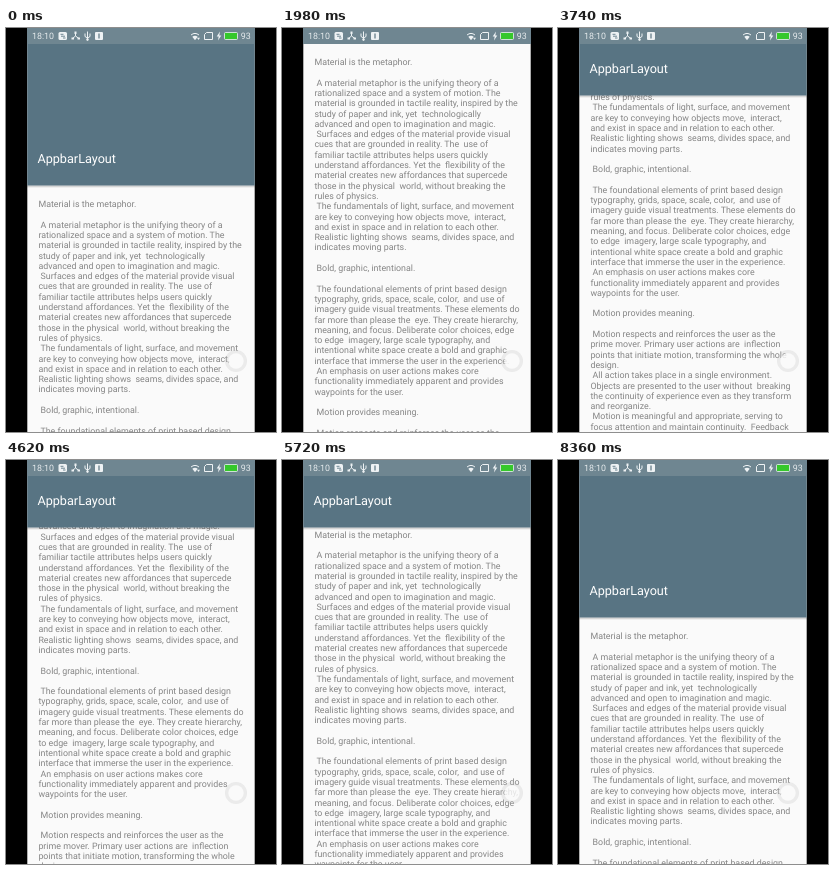
An HTML page that plays this animation: 270x404 px, repeating every 8800 ms.

```html
<!DOCTYPE html>
<html lang="en">
<head>
<meta charset="utf-8">
<title>AppbarLayout</title>
<style>
  html, body { margin: 0; height: 100%; overflow: hidden; background: #000; }
  svg { display: block; width: 100%; height: 100%; }
  text { font-family: Roboto, "Noto Sans", sans-serif; font-size: 8.87px; white-space: pre; text-rendering: geometricPrecision; }
  #lines { fill: #858585; }
  #title { font-size: 12.67px; fill: #fff; }
  #status text { fill: #e6ebed; }
  .line { fill: none; stroke: #eef2f4; stroke-width: 1; }
  .solid { fill: #eef2f4; }
  .mark { fill: none; stroke: #6f8691; }
</style>
</head>
<body>
<svg viewBox="0 0 270 404">
  <defs>
    <clipPath id="screen"><rect x="21.3" width="227.4" height="404"/></clipPath>
    <linearGradient id="fade" x2="0" y2="1">
      <stop offset="0" stop-opacity=".25"/>
      <stop offset="1" stop-opacity="0"/>
    </linearGradient>
  </defs>
  <rect width="270" height="404"/>
  <g clip-path="url(#screen)">
    <rect x="21" width="228" height="404" fill="#fafafa"/>
    <g id="lines"></g>
    <g id="bar">
      <rect id="shadow" x="21" width="228" height="2.5" fill="url(#fade)"/>
      <rect x="21" y="-160" width="228" height="160" fill="#587483"/>
      <text id="title" x="31.4" y="-22.2">AppbarLayout</text>
    </g>
    <g id="status">
      <rect x="21" width="228" height="16" fill="#6f8691"/>
      <text x="26" y="11.2">18:10</text>
      <rect class="solid" x="52.5" y="4" width="8.5" height="8" rx="1.5"/>
      <path class="mark" d="M54.5 6.3h3M55 8.200h4M57 10h2.500"/>
      <path class="line" d="M69.500 4v4l-3 2.500M69.500 8l3.500 2.500"/>
      <path class="solid" d="M68.500 3.500h2v2.500h-2zM65.500 9.500h2.500v2h-2.500zM71.500 9.500h2.500v2h-2.500z"/>
      <path class="line" d="M81.500 3.500v9M79 5.500v3l2.500 1.500 2.500-1.500v-3"/>
      <circle class="solid" cx="81.500" cy="11.500" r="1.200"/>
      <rect class="solid" x="89" y="4" width="8" height="8" rx="1"/>
      <path class="mark" stroke-width="1.400" d="M93 5.500v5"/>
      <path class="line" d="M185 7q4-3.200 8 0"/>
      <path class="solid" d="M186.300 8.800q2.700-2 5.400 0l-2.700 3.400z"/>
      <path class="solid" id="traffic" d="M191 9.700h3l-1.500 2.300z"/>
      <path class="line" d="M200.500 4.500h6v7h-8v-5z"/>
      <path class="solid" d="M214 3.500l-3.300 5h2l-.7 4 3.300-5h-2z"/>
      <rect x="218.500" y="4.500" width="13" height="7" rx="1" fill="#35c82b" stroke="#eef2f4" stroke-width=".8"/>
      <text x="234.700" y="11.200">93</text>
    </g>
    <circle cx="230" cy="333" r="11" fill="#bbb" fill-opacity=".25"/>
    <circle cx="230" cy="333" r="7.700" fill="#fff" fill-opacity=".75"/>
  </g>
</svg>
<script>
const copy = `Material is the metaphor.

 A material metaphor is the unifying theory of a
rationalized space and a system of motion. The
material is grounded in tactile reality, inspired by the
study of paper and ink, yet  technologically
advanced and open to imagination and magic.
 Surfaces and edges of the material provide visual
cues that are grounded in reality. The  use of
familiar tactile attributes helps users quickly
understand affordances. Yet the  flexibility of the
material creates new affordances that supercede
those in the physical  world, without breaking the
rules of physics.
 The fundamentals of light, surface, and movement
are key to conveying how objects move,  interact,
and exist in space and in relation to each other.
Realistic lighting shows  seams, divides space, and
indicates moving parts.

 Bold, graphic, intentional.

 The foundational elements of print based design
typography, grids, space, scale, color,  and use of
imagery guide visual treatments. These elements do
far more than please the  eye. They create hierarchy,
meaning, and focus. Deliberate color choices, edge
to edge  imagery, large scale typography, and
intentional white space create a bold and graphic
interface that immerse the user in the experience.
 An emphasis on user actions makes core
functionality immediately apparent and provides
waypoints for the user.

 Motion provides meaning.

 Motion respects and reinforces the user as the
prime mover. Primary user actions are  inflection
points that initiate motion, transforming the whole
design.
 All action takes place in a single environment.
Objects are presented to the user without  breaking
the continuity of experience even as they transform
and reorganize.
 Motion is meaningful and appropriate, serving to
focus attention and maintain continuity.  Feedback
is subtle yet clear. Transitions are efficient yet
coherent.

 3D world.

 The material environment is a 3D space, which`;

const LOOP = 8800, STEP = 220, LEADING = 10.3;
const STATUS = 16, TOOLBAR = 67.5, GAP = 18.5;
const TURN = 2860, LOWEST = -124.4;
// Time and height of the first line of text
const path = [[0, 176], [1320, 176], [1980, 34], [2640, -110], [TURN, LOWEST],
  [3740, -64.7], [4620, 4.5], [5720, 74.8], [6600, 176], [LOOP, 176]];

const $ = id => document.getElementById(id);
const move = (id, y) => $(id).setAttribute("transform", `translate(0 ${y})`);
const show = (id, on) => $(id).setAttribute("visibility", on ? "visible" : "hidden");

copy.split("\n").forEach((line, i) => {
  const text = document.createElementNS("http://www.w3.org/2000/svg", "text");
  text.setAttribute("x", 32.4);
  text.setAttribute("y", 3 + i * LEADING);
  text.textContent = line;
  $("lines").append(text);
});

function scrollAt(t) {
  const i = path.findIndex(([end]) => t < end);
  const [t0, y0] = path[i - 1], [t1, y1] = path[i];
  return y0 + (y1 - y0) * (t - t0) / (t1 - t0);
}

// The toolbar re-enters on the way back, then opens fully at the top
function barAt(t, y) {
  const entering = t < TURN ? STATUS : Math.min(TOOLBAR, STATUS + y - LOWEST);
  return Math.max(entering, y - GAP);
}

function draw(now) {
  const t = Math.floor(now % LOOP / STEP) * STEP;
  const y = scrollAt(t), bar = barAt(t, y);
  move("lines", y);
  move("bar", bar);
  show("shadow", bar > STATUS);
  show("traffic", t < 3080 || (t >= 4400 && t < 5060) || (t >= 7040 && t < 7700));
}

const start = performance.now();
function tick() {
  draw(performance.now() - start);
  requestAnimationFrame(tick);
}
tick();
</script>
</body>
</html>
```
